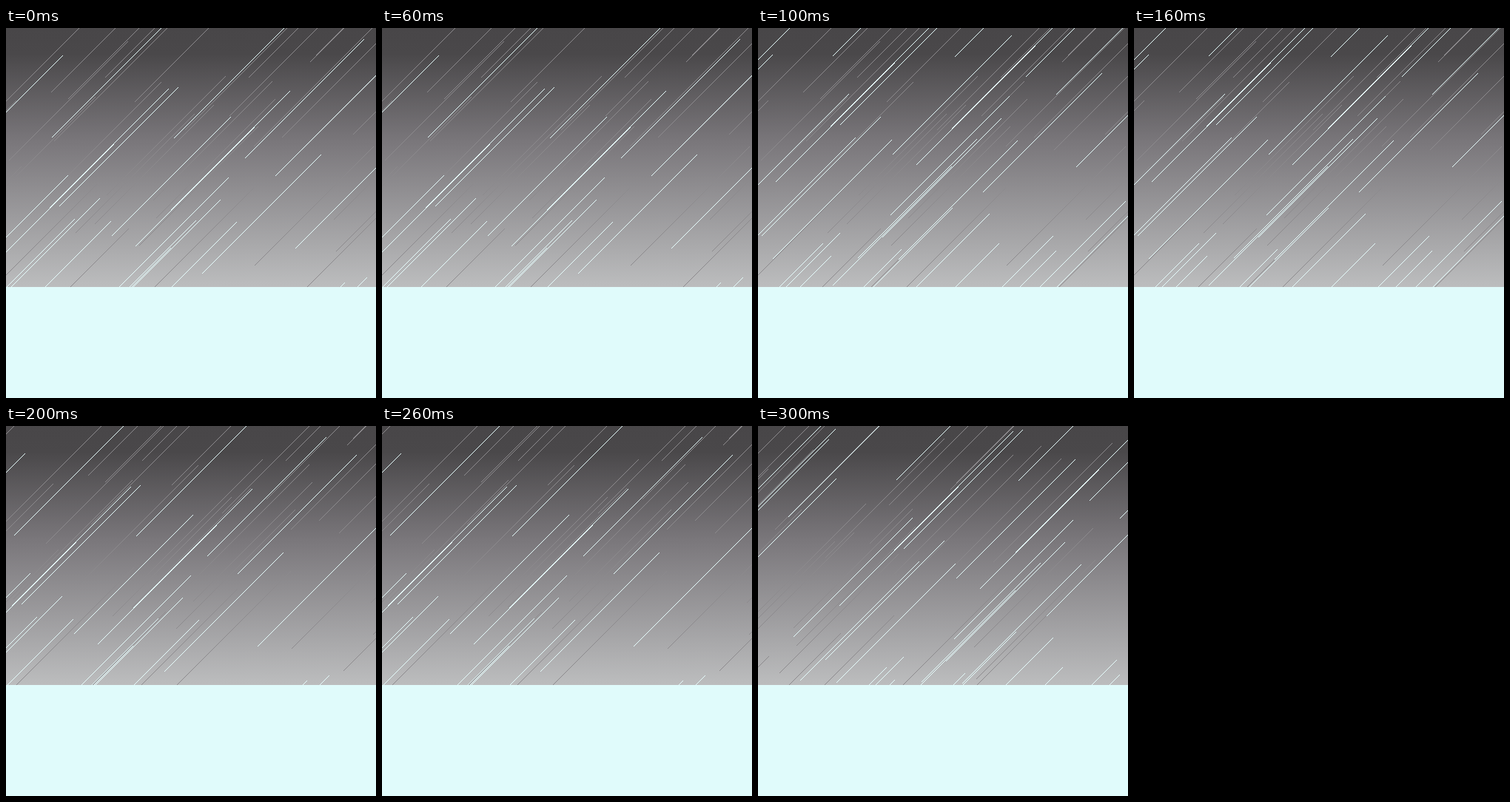
An HTML page with a canvas that plays this animation: 500x500 px, repeating every 400 ms.

```html
<!DOCTYPE html>
<html lang="en">
<head>
<meta charset="utf-8">
<title>Rain</title>
<style>
html, body { margin: 0; width: 100%; height: 100%; overflow: hidden; background: #e0fbfb; }
canvas { display: block; width: 500px; height: 500px; }
</style>
</head>
<body>
<canvas id="stage" width="500" height="500"></canvas>
<script>
const ctx = document.getElementById('stage').getContext('2d');
const SIZE = 500;
const HORIZON = 350;
const STEP = 100;
const REACH = 161;

function seeded(seed) {
  return () => {
    seed = (seed * 1664525 + 1013904223) % 4294967296;
    return seed / 4294967296;
  };
}

// Streaks are stored by their upper right end.
function scatter(count, seed, left, top, width, height) {
  const random = seeded(seed);
  return Array.from({ length: count }, () => [
    Math.round(left + random() * width),
    Math.round(top + random() * height)
  ]);
}

// The main streaks are placed; the edges of the sheet are filled at random.
const near = [
  [76, 37], [219, 82], [232, 80], [145, 157], [83, 199], [126, 230],
  [92, 258], [141, 261], [303, 120], [383, 85], [335, 134], [300, 202],
  [289, 232], [256, 260], [311, 262], [425, 171], [483, 15], [222, -13],
  [387, -12], [524, 39], [551, 137],
  ...scatter(13, 7, 20, 290, 560, 130),
  ...scatter(4, 21, -40, 40, 50, 120)
];
const far = scatter(36, 12, 10, -140, 640, 430);

// The picture jumps between four placements of the two sheets.
const poses = [
  { near: [0, 0], far: [0, 0] },
  { near: [39, -110], far: [0, 0] },
  { near: [-51, 0], far: [50, -20] },
  { near: [125, -75], far: [-151, 40] }
];

const sky = ctx.createLinearGradient(0, 0, 0, HORIZON);
sky.addColorStop(0, '#484648');
sky.addColorStop(0.1, '#4a484a');
sky.addColorStop(0.44, '#7a777b');
sky.addColorStop(1, '#bcbdbe');

// One pixel per row keeps the diagonals crisp.
function rain(streaks, [dx, dy], color) {
  ctx.fillStyle = color;
  for (const [x, y] of streaks) {
    for (let i = 0; i < REACH; i++) {
      const row = y + dy + i;
      if (row < HORIZON) ctx.fillRect(x + dx - i, row, 1, 1);
    }
  }
}

function draw(pose) {
  ctx.fillStyle = '#e0fbfb';
  ctx.fillRect(0, 0, SIZE, SIZE);
  ctx.fillStyle = sky;
  ctx.fillRect(0, 0, SIZE, HORIZON);
  rain(far, pose.far, '#8c8a8d');
  rain(near, pose.near, '#e6fcfc');
}

function tick() {
  draw(poses[Math.floor(performance.now() / STEP) % poses.length]);
  requestAnimationFrame(tick);
}
tick();
</script>
</body>
</html>
```
